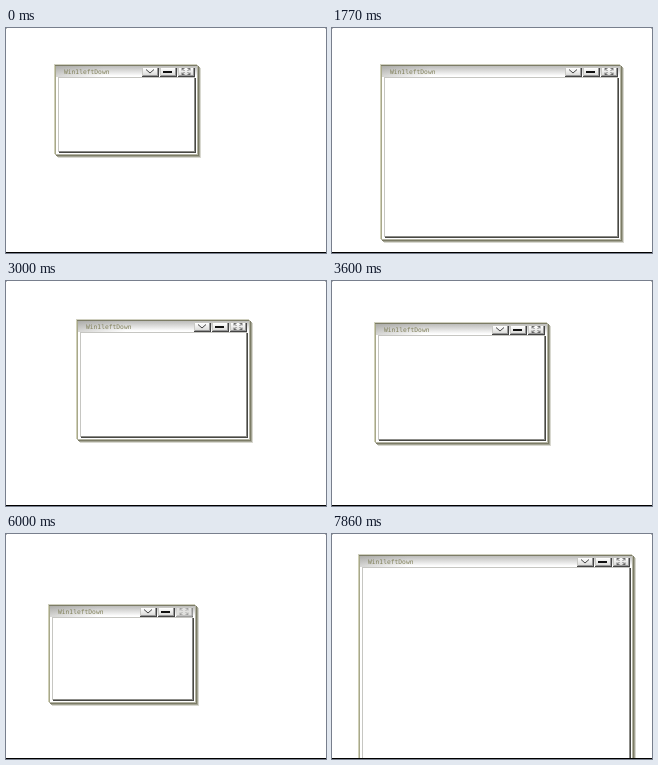
Recreate the animation shown at these times as an HTML page with a canvas. Size 320 by 225 pixels, loop 8 s.

```html
<!DOCTYPE html>
<html lang="en">
<head>
<meta charset="utf-8">
<title>Window resizing</title>
<style>
html, body { margin: 0; width: 100%; height: 100%; overflow: hidden; background: #fff; }
canvas { display: block; }
</style>
</head>
<body>
<canvas id="stage" width="320" height="225"></canvas>
<script>
const ctx = document.getElementById('stage').getContext('2d');
const LOOP = 8000, TICK = 30, FLOOR = 165;

const smooth = u => u * u * (3 - 2 * u);
const quadIn = u => u * u;

// Dragging the upper right corner keeps the lower edge on FLOOR.
const pullTop = (y, w) => ({ y, w, h: FLOOR - y });

// Each action changes only the properties it names; sizes include the shadow.
const home = { x: 48, y: 36, w: 147, h: 94 };
const actions = [
  { from: 1470, to: 1770, set: { w: 244, h: 179 } },
  { from: 1770, to: 2250, set: { w: 177, h: 124 } },
  { from: 2610, to: 2880, set: { x: 103, y: 50 } },
  { from: 2880, to: 3180, set: { x: 10, y: 16 } },
  { from: 3180, to: 3420, set: { x: 42, y: 41 } },
  { from: 4740, to: 5130, set: pullTop(109, 89) },
  { from: 5130, to: 5550, set: pullTop(70, 147) },
  { from: 5970, to: 6150, set: { w: 278, h: 350 }, ease: quadIn },
  { from: 6840, to: 7110, set: { x: 5, y: 45 } },
  { from: 7530, to: 7860, set: { x: 26, y: 20 } }
];

function pose(t) {
  const p = { ...home };
  for (const { from, to, set, ease = smooth } of actions) {
    if (t <= from) break;
    const u = ease(Math.min(1, (t - from) / (to - from)));
    for (const k in set) p[k] += (set[k] - p[k]) * u;
  }
  for (const k in p) p[k] = Math.round(p[k]);
  return p;
}

function box(color, x, y, w, h) {
  ctx.fillStyle = color;
  ctx.fillRect(x, y, w, h);
}

// Right and lower edge of the rectangle that ends at (r, b).
function corner(color, x, y, r, b) {
  box(color, r, y, 1, b - y + 1);
  box(color, x, b, r - x + 1, 1);
}

function line(...points) {
  ctx.beginPath();
  points.forEach(([x, y]) => ctx.lineTo(x, y));
  ctx.stroke();
}

function fade(x0, y0, x1, y1, from, to) {
  const g = ctx.createLinearGradient(x0, y0, x1, y1);
  g.addColorStop(0, from);
  g.addColorStop(1, to);
  return g;
}

function chevron() {
  line([4, 2.5], [8, 6], [12, 2.5]);
}

function bar() {
  box('#111', 3, 4, 9, 2);
}

function arrows() {
  for (const sx of [-1, 1]) for (const sy of [-1, 1]) {
    const x = 8 + sx * 4, y = 4.5 + sy * 3;
    line([x - sx * 2.5, y], [x, y], [x, y - sy * 2]);
    line([x, y], [x - sx * 2.5, y - sy * 2.5]);
  }
}

function button(x, y, icon, pale) {
  ctx.save();
  ctx.translate(x, y);
  ctx.globalAlpha = pale ? 0.45 : 1;
  box('#c8c8c4', 0, 0, 17, 10);
  box(fade(0, 1, 0, 8, '#fff', '#dcdcda'), 1, 1, 14, 7);
  corner('#999', 1, 1, 15, 8);
  corner('#444', 0, 1, 16, 9);
  ctx.strokeStyle = '#444';
  ctx.lineWidth = icon === arrows ? 0.7 : 1;
  icon();
  ctx.restore();
}

function drawWindow(w, h, pale) {
  // frame and shadow
  box('#fff', 0, 0, w - 3, h - 3);
  box('#d0d0b8', 0, 0, 1, h - 4);
  box('#a8a88a', 1, 1, 1, h - 5);
  box('#d0d0c0', 0, 0, w - 4, 1);
  box('#7c7c66', 1, 1, w - 5, 1);
  ['#b4b4a4', '#7c7c66', '#a4a494', '#d8d8d0'].forEach((color, i) =>
    corner(color, i + 1, i + 1, w - 4 + i, h - 4 + i));

  // title bar
  box(fade(0, 2, 0, 12, '#bcbcba', '#fff'), 2, 2, w - 6, 11);
  box(fade(2, 0, 50, 0, 'rgba(150,150,145,.4)', 'rgba(150,150,145,0)'), 2, 2, w - 6, 11);
  ctx.font = '6.3px "DejaVu Sans Mono", monospace';
  ctx.fillStyle = '#80805a';
  ctx.fillText('Win1leftDown', 10, 10);

  // client area
  box('#c6c6c2', 4, 13, w - 10, h - 19);
  box('#fff', 5, 14, w - 12, h - 21);
  corner('#8c8c88', 5, 14, w - 7, h - 7);
  corner('#484844', 5, 14, w - 6, h - 6);

  ctx.beginPath();
  ctx.rect(0, 0, w - 3, h - 3);
  ctx.clip();
  const left = Math.max(w - 59, 56);
  [chevron, bar, arrows].forEach((icon, i) =>
    button(left + i * 18, 3, icon, pale && icon === arrows));
}

function draw(now) {
  const t = Math.floor(now % LOOP / TICK) * TICK;
  const { x, y, w, h } = pose(t);
  const pale = (t >= 3480 && t < 3600) || (t >= 5850 && t < 6150);
  box('#fff', 0, 0, 320, 225);
  ctx.save();
  ctx.translate(x, y);
  drawWindow(w, h, pale);
  ctx.restore();
  box('#000', 0, 224, 320, 1);
  box('#bbb', 0, 0, 1, 1);
  box('#bbb', 319, 0, 1, 1);
}

const start = performance.now();
function loop() {
  draw(performance.now() - start);
  requestAnimationFrame(loop);
}
loop();
</script>
</body>
</html>
```
